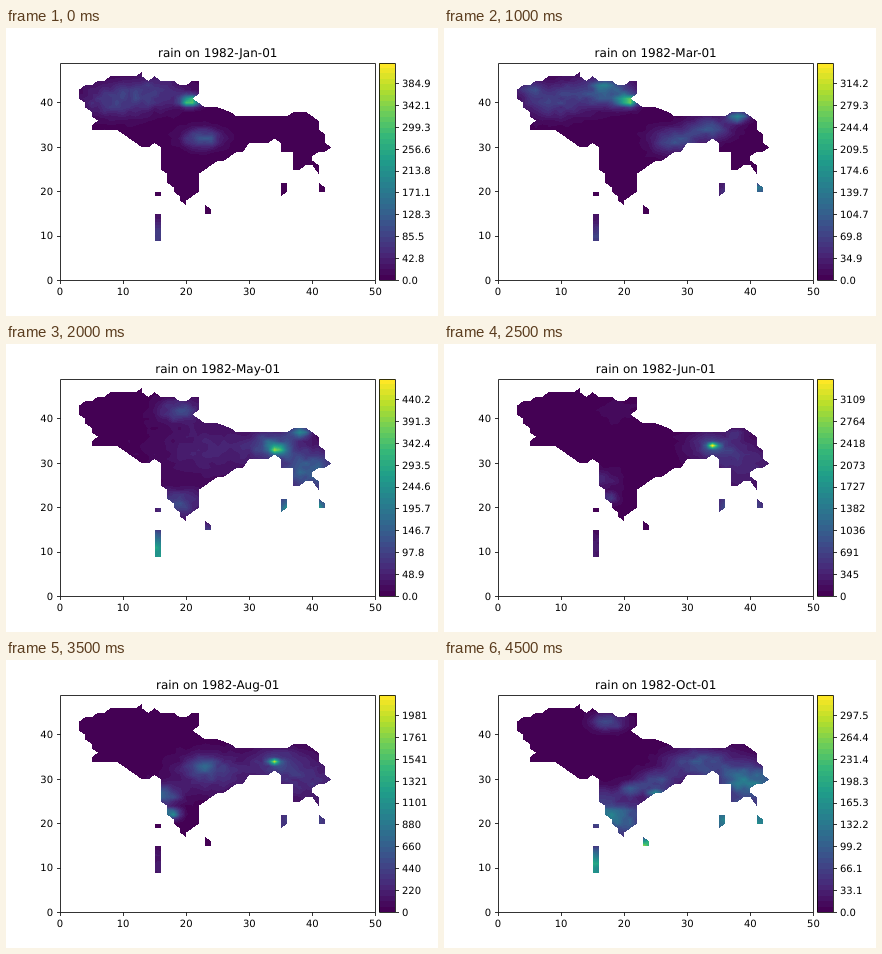
Animation, 432 px wide and 288 px high, one loop 5000 ms. Source, as an HTML page with a canvas:

```html
<!DOCTYPE html>
<html lang="en">
<head>
<meta charset="utf-8">
<title>Monthly rain</title>
<style>
  html, body { margin: 0; width: 100%; height: 100%; overflow: hidden; background: #fff; }
  canvas, svg { position: absolute; left: 0; top: 0; width: 432px; height: 288px; }
  text { font: 10px "DejaVu Sans", sans-serif; fill: #000; text-rendering: geometricPrecision; }
  #title { font-size: 12px; }
  path { fill: none; stroke: #000; stroke-width: .8; }
</style>
</head>
<body>
<canvas id="map" width="432" height="288"></canvas>
<svg id="axes" viewBox="0 0 432 288">
  <path d="M54.5 35.5H369.5V252.5H54.5ZM373.5 35.5H389.5V252.5H373.5Z"/>
  <text id="title" x="211.7" y="29" text-anchor="middle"></text>
</svg>
<script>
const LEFT = 54, BOTTOM = 252, TOP = 34.56, SX = 6.3086, SY = 4.4376;
const BANDS = 40, HOLD = 500, TICK_GAP = 21.88;
const ctx = document.getElementById('map').getContext('2d');
const axes = document.getElementById('axes');
const title = document.getElementById('title');

// Rain between two labels of the colour bar
const steps = { Jan: 42.764, Feb: 38.254, Mar: 34.914, Apr: 71.185, May: 48.914,
  Jun: 345.45, Jul: 260.37, Aug: 220.12, Sep: 58.21, Oct: 33.055 };
const names = Object.keys(steps);

// Land outlines in grid units
const mainland = 'M3 41V43L4 44H5L6 45H7L8 46H12L13 47V46L14 45L15 46L16 45H18L19 44H20L21 45H22V42L21 41' +
  'L23 39H25L27 38L28 37H36L37 38H39L41 36V34L42 33V31L43 30L42 29H41L40 28V27L41 26V24L40 26H39L38 25H37V29H35' +
  'V31L34 32L33 31H30L29 29H28L26 27H25L24 26L22 24V20L20 18V17L19 18V19L18 20V21L17 22V24L16 25V30L15 31' +
  'L14 30H13L9 34H5V35L6 36L5 37V38L4 39V40Z';
const islands = 'M15 15H16V9H15ZM15 20H16V19H15ZM23 17L24 16V15H23ZM35 22H36V20L35 19ZM41 22L42 21V20H41Z';
const land = new Path2D(mainland + islands);

const stops = ['440154', '482878', '3e4989', '31688e', '26828e', '1f9e89', '35b779', '6ece58', 'b5de2b', 'fde725']
  .map(hex => [0, 2, 4].map(i => parseInt(hex.slice(i, i + 2), 16)));
const palette = Array.from({ length: BANDS }, (_, i) => {
  const t = i / (BANDS - 1) * 9, k = Math.min(8, Math.floor(t));
  return stops[k].map((c, j) => Math.round(c + (stops[k + 1][j] - c) * (t - k)));
});

// Each season swells and fades around its peak month; spots are x, y, radius, strength
const seasons = [];
const season = (peak, spread, ...spots) => seasons.push({ peak, spread, spots });

season(0, .8, [22.5, 32, 1.5, .28]);
season(1, 1.4, [20.6, 40.5, .8, 1], [8.5, 40.5, 2.6, .22], [15, 42.5, 2.6, .2], [15.5, 9, 3.5, .24]);
season(2, .8, [28, 31.5, 1.9, .22], [5, 43.2, 1, .2], [17, 44, 1, .2], [41.5, 20.5, 1, .3]);
season(3, 1.7, [38, 37, .8, .55], [33.5, 34.3, 1.8, .26], [19, 42, 1.8, .22], [38.5, 20, 2, .25]);
season(3.5, .9, [34.6, 33, .7, .6], [15.5, 9, 3, .18], [23.5, 15, 1, .2]);
season(4, .7, [39.5, 28, 3, .25], [18.5, 21, 2, .22], [24, 33, 4.5, .09], [15.5, 11, 3, .35], [38.5, 19, 2, .45]);
season(6, 1.4, [34, 34, .45, 1]);
season(6.5, 2.6, [34.5, 34, 2.2, .15], [39, 30, 3.2, .13], [38.5, 20, 2.5, .25], [15.5, 11, 3, .08]);
season(7, 2, [17.5, 22.3, .8, .5], [16.2, 26.5, 1.4, .32]);
season(7, 1.3, [22.5, 33, 1.2, .2], [24, 31.5, 3, .16]);
season(9, 1, [21.3, 27.8, 1, .25], [25.2, 29.5, 1.6, .22], [25.2, 26.7, .7, .4], [19, 21, 2.8, .33],
  [31, 33.5, 2.4, .2], [39.8, 29.5, 2.6, .33], [17.5, 43, 1.3, .25], [15.5, 10, 3, .55],
  [23.5, 15.3, 1, .8], [38.5, 20.5, 2.5, .55]);

function grain(x, y, seed) {
  const v = Math.sin(x * 127.1 + y * 311.7 + seed * 74.7) * 43758.5453;
  return v - Math.floor(v);
}

function rainAt(x, y, month) {
  let rain = 0;
  for (const { peak, spread, spots } of seasons) {
    const weight = Math.exp(-(((month - peak) / spread) ** 4));
    if (weight < .01) continue;
    for (const [sx, sy, r, strength] of spots) {
      rain += weight * strength * Math.exp(-(((x - sx) / 1.3) ** 2 + (y - sy) ** 2) / (2 * r * r));
    }
  }
  return rain * (.78 + .44 * grain(x, y, month)) + .02 * grain(y, x, month);
}

// Hard-edged list of land pixels with their grid position
const pixels = [];
for (let py = 40; py < 216; py++) {
  for (let px = 70; px < 330; px++) {
    const x = (px + .5 - LEFT) / SX, y = (BOTTOM - py) / SY;
    if (ctx.isPointInPath(land, x, y)) pixels.push({ at: (py * 432 + px) * 4, x, y });
  }
}

function drawField(month) {
  const grid = Array.from({ length: 50 }, (_, y) =>
    Array.from({ length: 52 }, (_, x) => rainAt(x, y, month)));
  const image = ctx.createImageData(432, 288);
  for (const { at, x, y } of pixels) {
    const i = Math.floor(x), j = Math.floor(y), u = x - i, v = y - j;
    const rain = (grid[j][i] * (1 - u) + grid[j][i + 1] * u) * (1 - v) +
      (grid[j + 1][i] * (1 - u) + grid[j + 1][i + 1] * u) * v;
    const band = Math.min(BANDS - 1, Math.floor(rain * BANDS));
    image.data.set([...palette[band], 255], at);
  }
  ctx.putImageData(image, 0, 0);
}

function drawColorbar() {
  const height = (BOTTOM - TOP) / BANDS;
  palette.forEach((rgb, i) => {
    const y = Math.round(BOTTOM - (i + 1) * height);
    ctx.fillStyle = `rgb(${rgb})`;
    ctx.fillRect(373, y, 16, Math.round(BOTTOM - i * height) - y);
  });
}

function add(tag, attrs, content = '') {
  const el = document.createElementNS('http://www.w3.org/2000/svg', tag);
  for (const key in attrs) el.setAttribute(key, attrs[key]);
  el.textContent = content;
  axes.append(el);
  return el;
}

const snap = v => Math.round(v) + .5;

for (let v = 0; v <= 50; v += 10) {
  const x = LEFT + v * SX;
  add('path', { d: `M${snap(x)} 252.5v3.5` });
  add('text', { x, y: 267, 'text-anchor': 'middle' }, v);
  if (v > 40) continue;
  const y = BOTTOM - v * SY;
  add('path', { d: `M54.5 ${snap(y)}h-3.5` });
  add('text', { x: 47, y: Math.round(y + 3.8), 'text-anchor': 'end' }, v);
}

const barLabels = Array.from({ length: 10 }, (_, i) => {
  const y = BOTTOM - i * TICK_GAP;
  add('path', { d: `M389.5 ${snap(y)}h3.5` });
  return add('text', { x: 396, y: Math.round(y + 3.8) });
});

let shown = -1;
function frame() {
  const month = Math.floor(performance.now() / HOLD) % names.length;
  if (month !== shown) {
    shown = month;
    const name = names[month], step = steps[name];
    title.textContent = `rain on 1982-${name}-01`;
    barLabels.forEach((label, i) => label.textContent = (i * step).toFixed(step > 200 ? 0 : 1));
    drawField(month);
    drawColorbar();
  }
  requestAnimationFrame(frame);
}
frame();
</script>
</body>
</html>
```
